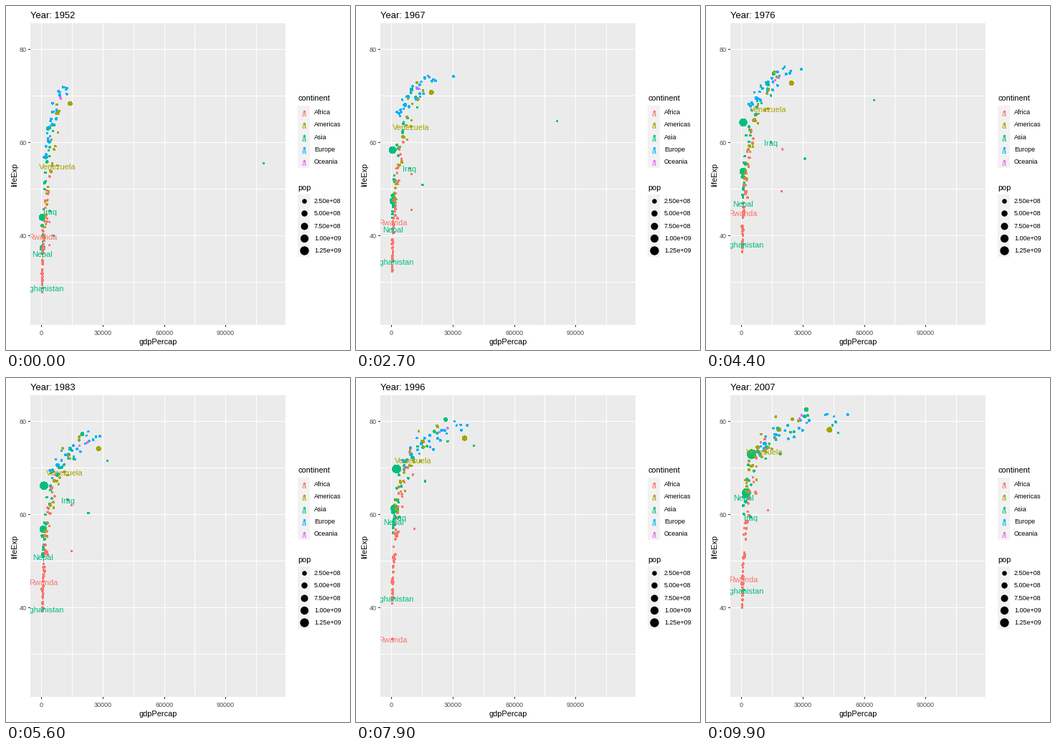
These frames come from a looping animation (480 by 480 pixels, 10000 ms). A matplotlib script:

```python
import numpy as np
import matplotlib.pyplot as plt
from matplotlib.animation import FuncAnimation
from matplotlib.patches import Rectangle

SIZE, DPI = 480, 100
PT = 72 / DPI                      # points per pixel
FRAMES, INTERVAL = 100, 100
FIRST, LAST = 1952, 2007
ERAS = (1952, 1967, 1989, 2007)
COLORS = {"Africa": "#F8766D", "Americas": "#A3A500", "Asia": "#00BF7D",
          "Europe": "#00B0F6", "Oceania": "#E76BF3"}

plt.rcParams["font.family"] = "Liberation Sans"
rng = np.random.default_rng(7)
countries = []


def add(continent, pop, growth, years, gdp, life, label=None):
    """Population in millions, gdp in thousands, life in years."""
    countries.append(dict(color=COLORS[continent], pop=pop, growth=growth,
                          years=years, gdp=gdp, life=life, label=label))


def lead(continent, pop, growth, *stops, label=None):
    """A prominent country moving through (year, gdp, life) stops."""
    add(continent, pop, growth, *zip(*stops), label=label)


def oil(continent, pop, start, end, peak, life):
    """An oil exporter: income humps around 1976 while life expectancy climbs."""
    years = np.arange(FIRST, LAST + 1, 5)
    t = (years - FIRST) / (LAST - FIRST)
    gdp = start + (end - start) * t + peak * np.exp(-((years - 1976) / 8) ** 2)
    add(continent, pop, 4, years, gdp, life[0] + (life[1] - life[0]) * t ** .85)


def crowd(continent, n, pop, growth, skew, noise, poor, rich):
    """Countries ranked between a poor and a rich (gdp, life) path over the eras."""
    (g0, l0), (g1, l1) = np.array(poor), np.array(rich)
    for i in range(n):
        rank = ((i + .5) / n) ** skew
        gdp = g0 * (g1 / g0) ** rank * np.exp(rng.normal(0, .12, 4))
        drift = rng.normal() + rng.normal(0, .5, 4)
        add(continent, pop * np.exp(rng.normal(0, 1.1)), growth, ERAS,
            gdp, l0 + (l1 - l0) * rank + noise * drift)


crowd("Africa", 49, 3, 3.3, 1.5, 2.2,
      poor=((.35, .45, .5, .45), (30, 34.5, 42, 42)),
      rich=((4, 6, 7.5, 12), (50, 58, 69, 74)))
crowd("Americas", 23, 5, 2.8, 1, 1.6,
      poor=((1.6, 1.6, 1.9, 1.8), (39, 46, 57, 64)),
      rich=((10, 15, 21, 28), (68, 72, 77, 80)))
crowd("Asia", 26, 8, 3, 1.2, 1.6,
      poor=((.4, .5, .6, 1), (36, 43, 53, 61)),
      rich=((6, 12, 24, 45), (64, 70, 76.5, 81)))
crowd("Europe", 30, 9, 1.2, .7, 1,
      poor=((1.4, 3, 4.2, 6), (55, 64.5, 69, 72)),
      rich=((13, 22, 31, 45), (72, 74, 77.5, 81)))
crowd("Oceania", 2, 4, 2.3, 1, .2,
      poor=((10, 14.4, 18, 24), (69, 71, 75, 80)),
      rich=((11, 14.6, 23, 36), (69.5, 71.5, 77, 81.5)))

oil("Asia", 4, 6, 19, 20, (40, 73))
oil("Africa", 1, 4, 12, 13, (43, 74))
oil("Africa", .4, 4, 13, 12, (38, 61))

lead("Americas", 158, 1.9, (1952, 14, 68.4), (1967, 19.5, 70.8), (1987, 29.9, 75),
     (2007, 43, 78.2))
lead("Asia", 86, 1.5, (1952, 3.2, 63), (1967, 9.8, 71.4), (1987, 22.4, 78.7),
     (2007, 31.7, 82.6))
lead("Asia", 556, 2.37, (1952, .4, 44), (1957, .6, 50.5), (1962, .5, 44.5),
     (1967, .6, 58.4), (1972, .7, 63.1), (1992, 1.7, 68.7), (2007, 5, 73))
lead("Asia", 372, 2.98, (1952, .5, 37.4), (1977, .8, 54.2), (1987, 1, 58.6),
     (2007, 2.5, 64.7))
lead("Asia", .16, 16, (1952, 108.4, 55.6), (1957, 113.5, 58), (1967, 80.9, 64.6),
     (1972, 109.3, 67.7), (1977, 59.3, 69.3), (1982, 31.4, 71.3), (2007, 47.3, 77.6))
lead("Americas", 5.4, 4.8, (1952, 7.7, 55.1), (1967, 9.5, 63.5), (1977, 13.1, 67.5),
     (1987, 9.9, 70.2), (2007, 11.4, 73.7), label="Venezuela")
lead("Asia", 5.4, 5, (1952, 4.1, 45.3), (1967, 8.9, 54.5), (1977, 14.7, 60.4),
     (1987, 11.6, 65), (1992, 3.7, 59.5), (2007, 4.5, 59.5), label="Iraq")
lead("Africa", 2.5, 3.5, (1952, .5, 40), (1982, .9, 46.2), (1987, .8, 44),
     (1992, .7, 23.6), (1997, .6, 36.1), (2007, .9, 46.2), label="Rwanda")
lead("Asia", 9.2, 3.1, (1952, .5, 36.2), (1967, .7, 41.5), (1997, 1, 59.2),
     (2007, 1.1, 63.8), label="Nepal")
lead("Asia", 8.4, 3.8, (1952, .8, 28.8), (1977, .8, 38.4), (1987, .8, 40.8),
     (2007, 1, 43.8), label="Afghanistan")

countries.sort(key=lambda c: -c["pop"])     # small points on top
pop = np.array([c["pop"] for c in countries])
growth = np.array([c["growth"] for c in countries])


def px(gdp):
    return 49.4 + 2.86 * gdp


def py(life):
    return 60.7 + 6.5 * (80 - life)


def series(key, year):
    return np.array([np.interp(year, c["years"], c[key]) for c in countries])


def marker(pop):
    """Marker area in points^2 for a population in millions."""
    share = np.clip((pop - .06) / 1318.6, 0, 1)
    font = (1 + 5 * np.sqrt(share)) * 2.845 + .945
    return ((.75 * font - .9) * PT) ** 2


fig = plt.figure(figsize=(SIZE / DPI, SIZE / DPI), dpi=DPI, facecolor="white")
ax = fig.add_axes([0, 0, 1, 1])
ax.set(xlim=(0, SIZE), ylim=(SIZE, 0))
ax.axis("off")


def box(x, y, w, h, color):
    return ax.add_patch(Rectangle((x, y), w, h, fc=color, lw=0, antialiased=False, zorder=1))


def text(x, y, s, size, color="black", **kw):
    kw = {"va": "baseline", "zorder": 4, **kw}
    return ax.text(x, y, s, fontsize=size * PT, color=color, **kw)


def dots(x, y, area, color):
    return ax.scatter(x, y, s=area, c=color, linewidths=0, antialiased=False, zorder=3)


panel = box(34, 24, 356, 421, "#EBEBEB")
for gdp in range(0, 106, 15):
    x = int(px(gdp))
    box(x, 24, 1, 421, "white")
    if gdp % 30 == 0:
        box(x, 445, 1, 3, "#333333")
        text(x, 459, str(gdp * 1000), 9, "#4D4D4D", ha="center")
for life in range(30, 81, 10):
    y = int(py(life))
    box(34, y, 356, 1, "white")
    if life % 20 == 0:
        box(31, y, 3, 1, "#333333")
        text(29, y + 4, str(life), 9, "#4D4D4D", ha="right")
text(212, 472.5, "gdpPercap", 11, ha="center")
text(12, 235, "lifeExp", 11, ha="center", va="center", rotation=90)
title = text(34, 17, "", 13)

# Legends
KEY = 17.28
text(407, 132, "continent", 11)
box(407, 139, 17, 87, "#F2F2F2")
for i, (name, color) in enumerate(COLORS.items()):
    y = 148 + KEY * i
    dots([415.5], [y - 1.5], (3.4 * PT) ** 2, color)
    text(415.5, y + 6, "a", 11, color, ha="center")
    text(430, y + 3.2, name, 9)
text(407, 257, "pop", 11)
box(407, 263, 17, 87, "#F2F2F2")
for i in range(5):
    amount, y = 250 * (i + 1), 272 + KEY * i
    dots([415.5], [y], marker(amount), "black")
    text(430, y + 3.2, f"{amount * 1e6:.2e}", 9)

n = len(countries)
points = dots(np.zeros(n), np.zeros(n), np.ones(n), [c["color"] for c in countries])
labels = []
for i, c in enumerate(countries):
    if c["label"]:
        label = text(0, 0, c["label"], 11, c["color"], ha="center", clip_on=True)
        label.set_clip_path(panel)
        labels.append((i, label))


def draw(frame):
    t = frame / (FRAMES - 1)
    year = FIRST + (LAST - FIRST) * t
    x, y = px(series("gdp", year)), py(series("life", year))
    points.set_offsets(np.column_stack([x, y]))
    points.set_sizes(marker(pop * growth ** t))
    for i, label in labels:
        label.set_position((x[i], y[i] + 5))
    title.set_text(f"Year: {round(year)}")
    return [points, title]


anim = FuncAnimation(fig, draw, frames=FRAMES, interval=INTERVAL, repeat=True,
                     repeat_delay=0, blit=False)
plt.show()
```
